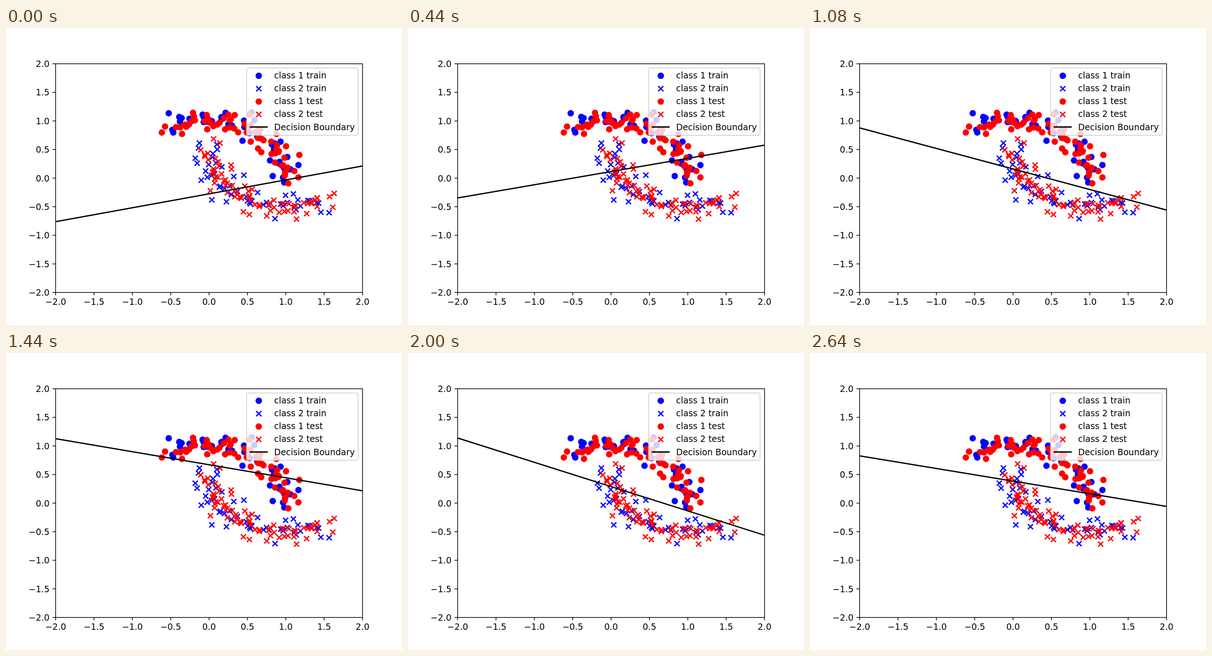
Animation, 864 px wide and 648 px high, one loop 2.68 s. Source, as an HTML page with a canvas:

```html
<!DOCTYPE html>
<html>
<head>
<meta charset="utf-8">
<style>
html, body { margin: 0; width: 100%; height: 100%; overflow: hidden; background: #fff; }
canvas { display: block; }
</style>
</head>
<body>
<canvas id="stage" width="864" height="648"></canvas>
<script>
const c = document.getElementById('stage').getContext('2d');
const BLUE = '#00f', RED = '#f00', LOOP = 2680, STEP = 40;
const LEFT = 108, TOP = 77.76, WIDTH = 669.6, HEIGHT = 498.96;
const px = x => LEFT + (x + 2) * WIDTH / 4;
const py = y => TOP + (2 - y) * HEIGHT / 4;

let seed = 20;
const random = () => (seed = seed * 16807 % 2147483647) / 2147483647;
const noise = () => (random() + random() - 1) * 0.13;

// The outlying points are placed in pixels; the dense part of each moon is generated.
function makeSet(label, color, shape, outliers, fill) {
  const points = [];
  for (let i = 0; i < fill; i++) {
    const angle = 0.03 + 2 * (i + random()) / fill;
    const x = Math.cos(angle), y = Math.sin(angle);
    points.push(shape === dot
      ? [px(x + noise()), py(y + noise())]
      : [px(1 - x + noise()), py(0.5 - y + noise())]);
  }
  for (let i = 0; i < outliers.length; i += 2) points.push(outliers.slice(i, i + 2));
  return { label, color, shape, points };
}

function dot(x, y, color) {
  c.fillStyle = color;
  c.beginPath();
  c.arc(x, y, 7, 0, 2 * Math.PI);
  c.fill();
}

function line(x1, y1, x2, y2, width, color = '#000') {
  c.strokeStyle = color;
  c.lineWidth = width;
  c.beginPath();
  c.moveTo(x1, y1);
  c.lineTo(x2, y2);
  c.stroke();
}

function cross(x, y, color) {
  line(x - 5.6, y - 5.6, x + 5.6, y + 5.6, 2.8, color);
  line(x - 5.6, y + 5.6, x + 5.6, y - 5.6, 2.8, color);
}

function text(value, x, y, align) {
  c.fillStyle = '#000';
  c.textAlign = align;
  c.fillText(value, x, y);
}

const sets = [
  makeSet('class 1 train', BLUE, dot, [
    355,186, 378,194, 365,228, 429,189, 479,185, 516,246, 536,184,
    542,201, 576,289, 638,299, 582,323, 607,337, 599,248], 32),
  makeSet('class 2 train', BLUE, cross, [
    422,251, 420,262, 413,284, 417,295, 426,332, 449,375, 460,254,
    461,265, 471,303, 497,324, 519,321, 481,379, 549,359, 610,365,
    627,362, 687,402, 705,403, 587,416, 682,382], 32),
  makeSet('class 1 test', RED, dot, [
    340,228, 347,215, 384,231, 408,185, 438,190, 439,221, 478,221,
    485,189, 499,190, 532,189, 534,248, 550,263, 557,271, 590,231,
    611,258, 640,277, 629,312, 638,326, 616,339], 48),
  makeSet('class 2 test', RED, cross, [
    453,242, 467,251, 425,266, 446,355, 455,338, 491,299, 463,292,
    492,308, 521,345, 537,352, 531,407, 518,401, 569,410, 634,417,
    706,368, 716,361, 713,391, 656,405, 675,375], 56)
];

// Time in ms, then the boundary's height at x = -2 and x = 2.
const boundary = [
  [0, -0.765, 0.21], [440, -0.35, 0.575], [760, 0.045, 0.185],
  [920, 1.56, -0.88], [1080, 0.877, -0.56], [1280, 1.13, -0.59],
  [1440, 1.125, 0.213], [1840, 1.33, -0.64], [2000, 1.137, -0.563],
  [2400, 1.15, -0.5], [2640, 0.825, -0.06]
];

function boundaryAt(t) {
  const next = Math.max(1, boundary.findIndex(k => k[0] >= t));
  const a = boundary[next - 1], b = boundary[next];
  const part = (t - a[0]) / (b[0] - a[0]);
  return [1, 2].map(i => a[i] + (b[i] - a[i]) * part);
}

function drawAxes() {
  c.strokeStyle = '#000';
  c.lineWidth = 1.5;
  c.strokeRect(LEFT + 0.3, TOP + 0.3, WIDTH, HEIGHT);
  for (let v = -2; v <= 2; v += 0.5) {
    const label = v.toFixed(1).replace('-', '\u2212');
    const x = px(v) + 0.3, y = py(v) + 0.3, bottom = TOP + HEIGHT;
    line(x, bottom, x, bottom + 6.6, 1.5);
    line(LEFT - 6.6, y, LEFT, y, 1.5);
    text(label, x, 604.3, 'center');
    text(label, 94.9, y + 7, 'right');
  }
}

function drawLegend() {
  c.fillStyle = 'rgba(255,255,255,.8)';
  c.strokeStyle = 'rgba(204,204,204,.8)';
  c.lineWidth = 1.9;
  c.beginPath();
  c.roundRect(525, 87.3, 243.2, 146.7, 3.75);
  c.fill();
  c.stroke();
  sets.forEach((set, i) => {
    const y = 104.3 + i * 28.1;
    set.shape(551.5, y, set.color);
    text(set.label, 585, y + 5.7, 'left');
  });
  line(531.5, 216, 571, 216, 2.8);
  text('Decision Boundary', 585, 222.5, 'left');
}

function draw(now) {
  const t = Math.floor(now % LOOP / STEP) * STEP;
  c.fillStyle = '#fff';
  c.fillRect(0, 0, 864, 648);
  c.font = '18.75px "DejaVu Sans", sans-serif';
  for (const set of sets) {
    for (const [x, y] of set.points) set.shape(x, y, set.color);
  }
  const [y1, y2] = boundaryAt(t);
  line(px(-2), py(y1), px(2), py(y2), 2.8);
  drawAxes();
  drawLegend();
  requestAnimationFrame(() => draw(performance.now() - start));
}

const start = performance.now();
draw(0);
</script>
</body>
</html>
```
